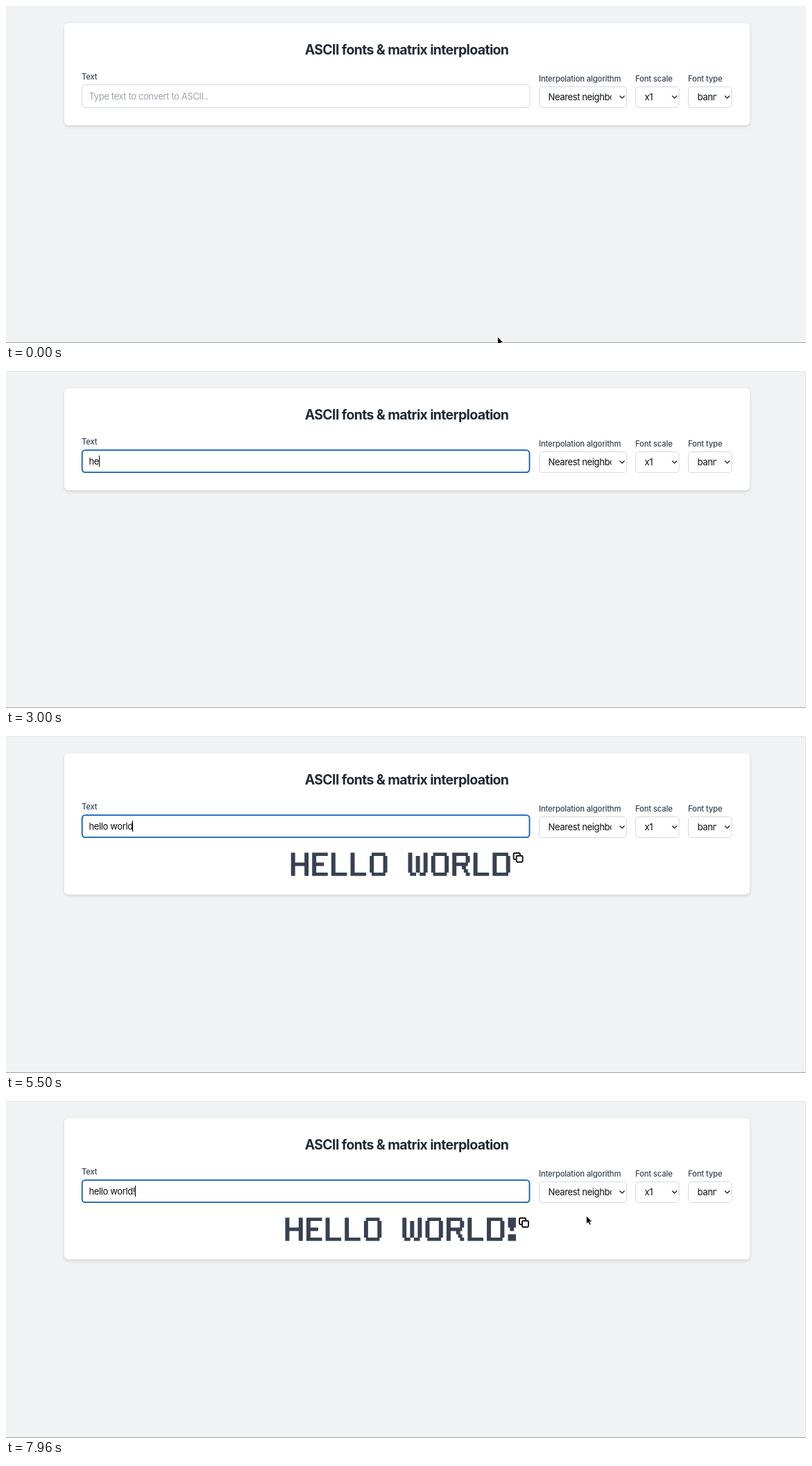
Animation of 1153x486 px, one loop 8 s. Source, as an HTML page:

```html
<!DOCTYPE html>
<html lang="en">
<head>
<meta charset="utf-8">
<title>ASCII fonts</title>
<style>
  html, body { margin: 0; width: 100%; height: 100%; overflow: hidden; background: #f1f2f4; }
  svg { display: block; }
  text { font: 400 13px Inter, "Open Sans", sans-serif; letter-spacing: -.38px; white-space: pre; fill: #0b0d10; }
  .title { font-size: 19.4px; font-weight: 700; letter-spacing: -.6px; fill: #1f2933; text-anchor: middle; }
  .label { font-size: 11.2px; font-weight: 500; letter-spacing: -.12px; fill: #374151; }
  #hint { fill: #9ca3af; }
  .field { fill: #fff; stroke: #d5d8dd; }
  .line { fill: none; stroke: #111; stroke-width: 1.2; }
  #card { fill: #fff; filter: drop-shadow(0 2px 2px rgba(0, 0, 0, .13)); }
</style>
</head>
<body>
<svg width="1153" height="486" viewBox="0 0 1153 486">
  <path id="edge" d="M0 .5H1152.5V485" fill="none" stroke="#e4e6e9"/>
  <path d="M0 485.5H1153" stroke="#a3a4a6"/>
  <rect id="card" x="84" y="25" width="988" height="147" rx="6"/>
  <text class="title" x="577.5" y="69.7">ASCII fonts &amp; matrix interploation</text>
  <text class="label" x="109" y="106.4">Text</text>
  <rect id="input" class="field" rx="4.5"/>
  <text id="hint" x="119.5" y="135">Type text to convert to ASCII..</text>
  <text id="typed" x="119.5" y="135"></text>
  <path id="caret" d="M.5 122V138" stroke="#000"/>
  <g id="selects"></g>
  <path id="banner" fill="#374151"/>
  <g id="copy" fill="none" stroke="#0b0d10" stroke-width="1.9" stroke-linejoin="round">
    <rect x="4.8" y="4.8" width="9" height="9" rx="1.5"/>
    <path d="M4.8 10H2.3A1.5 1.5 0 0 1 .8 8.5V2.3A1.5 1.5 0 0 1 2.3 .8H8.5A1.5 1.5 0 0 1 10 2.3V4.8"/>
  </g>
  <path id="arrow" d="M0 0V11.6L2.7 9.2L4.5 13.3L6.5 12.4L4.7 8.4H8.3Z" fill="#000" stroke="#fff" stroke-width=".7"/>
  <path id="beam" d="M-3-8Q0-8 0-6Q0-8 3-8M0-6V6M-3 8Q0 8 0 6Q0 8 3 8M-1.5 2H1.5" class="line"/>
</svg>
<script>
const LOOP = 8000, COL = 2.767, ROW = 4.8, TOP = 168.2, BLEED = .4;
const $ = id => document.getElementById(id);
const show = (el, on) => el.style.display = on ? '' : 'none';
const place = (el, x, y) => el.setAttribute('transform', `translate(${x} ${y})`);
const setAttrs = (el, attrs) => Object.entries(attrs).forEach(([k, v]) => el.setAttribute(k, v));

$('selects').innerHTML = [
  ['Interpolation algorithm', 'Nearest neighbor', 768, 127],
  ['Font scale', 'x1', 907, 63.5],
  ['Font type', 'banner', 983, 63.5]
].map(([label, value, x, w], i) => `
  <text class="label" x="${x}" y="108.5">${label}</text>
  <rect class="field" x="${x + .5}" y="116.5" width="${w - 1}" height="30" rx="4.5"/>
  <clipPath id="clip${i}"><rect x="${x}" y="117" width="${w - 22.5}" height="29"/></clipPath>
  <text x="${x + 13.5}" y="136" clip-path="url(#clip${i})">${value}</text>
  <path class="line" d="M${x + w - 10.5} 129.5l3.5 3.5l3.5-3.5"/>`).join('');

// Seven rows per letter
const side = '##     ##', stem = '##';
const glyphs = {
  H: [side, side, side, '#########', side, side, side],
  E: ['########', stem, stem, '######', stem, stem, '########'],
  L: [stem, stem, stem, stem, stem, stem, '########'],
  O: [' ####### ', side, side, side, side, side, ' ####### '],
  W: ['##      ##', ...Array(5).fill('##  ##  ##'), ' ###  ### '],
  R: ['######## ', side, side, '######## ', '##   ##', '##    ##', side],
  D: ['######## ', side, side, side, side, side, '######## '],
  '!': ['####', '####', '####', ' ## ', '', '####', '####'],
  ' ': Array(7).fill('       ')
};
const glyphWidth = g => Math.max(...g.map(r => r.length));

function drawBanner(word) {
  const letters = [...word].map(c => glyphs[c]);
  const cols = letters.reduce((sum, g) => sum + glyphWidth(g) + 2, -2);
  let x = 568.5 - cols * COL / 2, d = '';
  for (const g of letters) {
    g.forEach((row, r) => {
      for (const run of row.matchAll(/#+/g)) {
        const w = run[0].length * COL + BLEED;
        d += `M${x + run.index * COL} ${TOP + r * ROW}h${w}v${ROW}h${-w}z`;
      }
    });
    x += (glyphWidth(g) + 2) * COL;
  }
  $('banner').setAttribute('d', d);
  place($('copy'), x - 2 * COL + 4.6, 168);
}

const PHRASE = 'hello world!';
const keyTimes = [2750, 2920, 3170, 3290, 3500, 3710, 3920, 4130, 4630, 4960, 5170, 5580];
const outputs = [[3920, 5], [4460, 8], [4960, 9], [5500, 11], [5920, 12]];
const FOCUS = 2040, CARET = 2080;

// Pointer strokes: [time, x, y] points, visible until the given end
const strokes = [
  { end: 210, points: [[0, 708.5, 477], [40, 708.5, 477], [210, 707, 490]] },
  { end: 2750, points: [[710, 712, 430], [900, 590, 320], [1100, 450, 205], [1290, 386.5, 153],
    [1460, 380, 142], [1580, 380, 142], [1880, 375.5, 140]] },
  { end: LOOP, points: [[7120, 375.5, 140], [7880, 793, 166.5], [7960, 836.5, 165.7]] }
];

function pointerAt(t) {
  const stroke = strokes.find(s => t >= s.points[0][0] && t < s.end);
  if (!stroke) return null;
  const { points } = stroke;
  const i = points.findLastIndex(p => p[0] <= t);
  const [t0, x0, y0] = points[i], [t1, x1, y1] = points[i + 1] || [t0 + 1, x0, y0];
  const k = (t - t0) / (t1 - t0);
  return [x0 + (x1 - x0) * k, y0 + (y1 - y0) * k];
}

function render(t) {
  const focused = t >= FOCUS;
  const count = keyTimes.filter(k => k <= t).length;
  const output = outputs.findLast(o => o[0] <= t);

  show($('edge'), focused);
  setAttrs($('input'), focused
    ? { x: 109.7, y: 114.1, width: 644.8, height: 32, style: 'stroke:#0f5cb8;stroke-width:1.8' }
    : { x: 109.5, y: 113.5, width: 645.5, height: 33, style: '' });
  show($('hint'), !count);
  $('typed').textContent = PHRASE.slice(0, count);

  const lastInput = count ? keyTimes[count - 1] : CARET;
  show($('caret'), t >= CARET && (t - lastInput) % 1000 < 500);
  place($('caret'), count ? 119 + Math.round($('typed').getComputedTextLength()) : 119, 0);

  $('card').setAttribute('height', output ? 203.5 : 147);
  show($('banner'), output);
  show($('copy'), output);
  if (output) drawBanner(PHRASE.slice(0, output[1]).toUpperCase());

  const pos = pointerAt(t);
  const overInput = pos && pos[0] > 109 && pos[0] < 755 && pos[1] > 113 && pos[1] < 147;
  show($('arrow'), pos && !overInput);
  show($('beam'), overInput);
  if (pos) [$('arrow'), $('beam')].forEach(el => place(el, ...pos));
}

const start = performance.now();
function tick() {
  render((performance.now() - start) % LOOP);
  requestAnimationFrame(tick);
}
tick();
</script>
</body>
</html>
```
